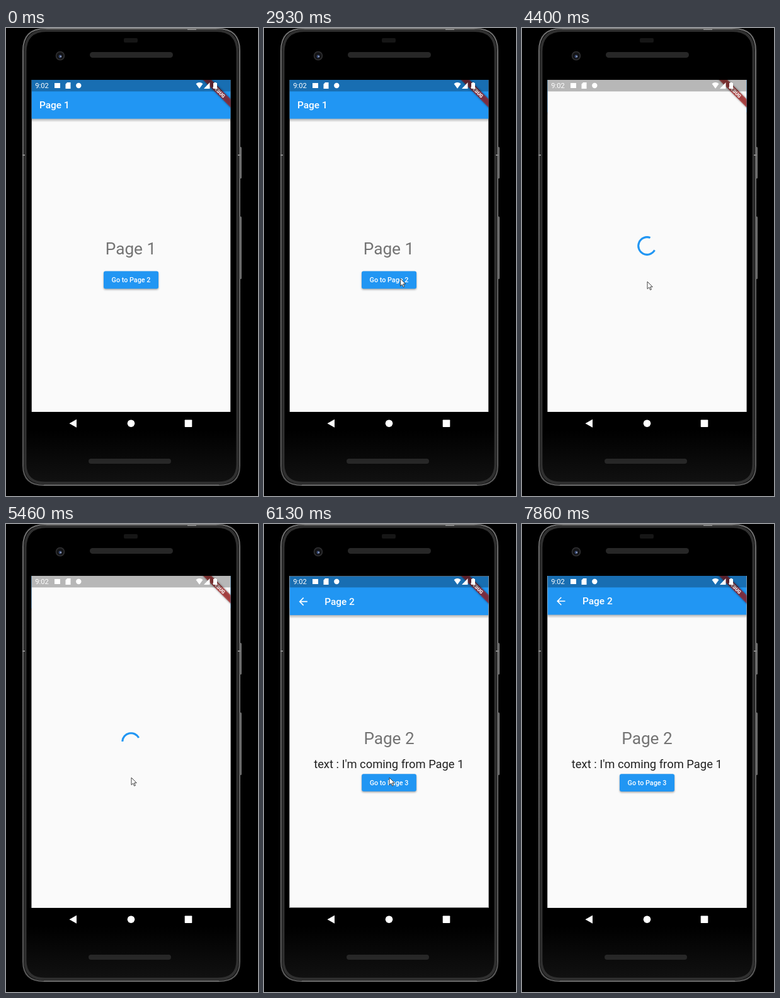
Recreate the animation shown at these times as an HTML page. Size 400x740 px, loop 8 s.

```html
<!DOCTYPE html>
<html lang="en">
<head>
<meta charset="utf-8">
<title>Page navigation</title>
<style>
  html, body { margin: 0; width: 100%; height: 100%; overflow: hidden; background: #000; }
  svg { display: block; width: 400px; height: 740px; font-family: Roboto, sans-serif; }
  .title { font-size: 15.4px; font-weight: 500; fill: #fff; }
  .head { font-size: 26.2px; fill: #737373; text-anchor: middle; }
  .body { font-size: 18.4px; fill: #202020; text-anchor: middle; }
  .label { font-size: 10.8px; font-weight: 500; fill: #fff; text-anchor: middle; }
  .soft { filter: blur(1.5px); }
</style>
</head>
<body>
<svg id="stage" viewBox="0 0 400 740"></svg>
<script>
const LOOP = 8000, PUSH_LOADER = 3880, PUSH_PAGE2 = 5932, ZOOM = 300;
const CX = 198.5, CY = 344.5;
const BLUE = '#2196f3', PAPER = '#fafafa';

const screenRect = (fill, extra = '') =>
  `<rect x="40.5" y="82" width="316" height="525" fill="${fill}" ${extra}/>`;

const appBar = (title, x) => `
  <rect x="40.5" y="143" width="316" height="6" fill="url(#shade)"/>
  <rect x="40.5" y="82" width="316" height="61.5" fill="${BLUE}"/>
  <text class="title" x="${x}" y="127.3">${title}</text>`;

const button = (y, label) => `
  <rect class="soft" x="155" y="${y + 1.5}" width="87" height="27.7" rx="3" opacity=".35"/>
  <rect x="155" y="${y}" width="87" height="27.7" rx="3" fill="${BLUE}"/>
  <text class="label" x="${CX}" y="${y + 17.7}">${label}</text>`;

const phone = `
  <rect x="370" y="188" width="4" height="50" rx="1.5" fill="#6e6e6e"/>
  <rect x="370" y="298" width="4" height="99" rx="1.5" fill="#6e6e6e"/>
  <path d="M62 1H336Q371 1 371 36V692Q371 723 338 723H60Q27 723 27 692V36Q27 1 62 1Z"
    fill="url(#body)" stroke="url(#rim)" stroke-width="2"/>
  <path d="M64 4H334Q367.5 4 367.5 38V690Q367.5 719.5 336 719.5H62Q30.5 719.5 30.5 690V38Q30.5 4 64 4Z"
    fill="none" stroke="#303030" stroke-width="4"/>
  <path d="M64 1.5H334M60 722.5H338" stroke="#808080" stroke-width="1.2"/>
  <path d="M26 201H30M288 2H302M368 201H372" stroke="#8c8c8c" stroke-width="2"/>
  <rect x="187" y="16" width="22" height="7" rx="2" fill="#161616"/>
  <rect x="133" y="38" width="132" height="9" rx="4.5" fill="#272727"/>
  <rect x="131" y="681" width="131" height="8" rx="4" fill="#272727"/>
  <circle cx="86" cy="44" r="6.5" fill="#141416" stroke="#303032" stroke-width="1.5"/>
  <circle cx="86" cy="45" r="2.4" fill="#3a4d78"/>
  <circle cx="87" cy="45" r=".9" fill="#c3cbe0"/>
  <g fill="#fff">
    <path d="M100.5 625.2L112 618.7V631.7Z"/>
    <circle cx="198.5" cy="625.2" r="5.8"/>
    <rect x="283.7" y="619.4" width="11.6" height="11.6" rx=".8"/>
  </g>`;

const banner = `
  <g transform="translate(356.5 82) rotate(45)">
    <rect class="soft" x="-33" y="21.5" width="66" height="9.3" opacity=".5"/>
    <rect x="-33" y="21.5" width="66" height="9.3" fill="#b71c1c" opacity=".63"/>
    <text y="28.9" font-size="7.6" font-weight="900" fill="#fff" text-anchor="middle">DEBUG</text>
  </g>`;

const statusBar = `
  <rect x="40.5" y="82" width="316" height="18.3" opacity=".27"/>
  <g fill="#fff">
    <text x="46.3" y="95.2" font-size="11.2">9:02</text>
    <rect x="77" y="87" width="9" height="8"/>
    <path d="M97.2 86H102.5V96H94.5V88.7Z"/>
    <circle cx="115.3" cy="91" r="4.2"/>
    <path d="M301.5 88.2Q307 83.8 312.5 88.2L307 95.7Z"/>
    <path d="M323.5 86V96H314Z"/>
    <path d="M330.5 86H333.5V87H335V96H329V87H330.5Z"/>
  </g>`;

document.getElementById('stage').innerHTML = `
  <defs>
    <linearGradient id="shade" x2="0" y2="1">
      <stop stop-opacity=".3"/><stop offset="1" stop-opacity="0"/>
    </linearGradient>
    <linearGradient id="body" x2="0" y2="1">
      <stop offset=".88"/><stop offset="1" stop-color="#121212"/>
    </linearGradient>
    <linearGradient id="rim" x2="0" y2="1">
      <stop stop-color="#707070"/><stop offset="1" stop-color="#585858"/>
    </linearGradient>
    <clipPath id="screen">${screenRect('#fff')}</clipPath>
  </defs>
  <rect width="400" height="740"/>
  ${phone}
  <g clip-path="url(#screen)">
    <g id="page1">
      ${screenRect(PAPER)}
      ${appBar('Page 1', 53)}
      <text class="head" x="198" y="358">Page 1</text>
      ${button(384.5, 'Go to Page 2')}
    </g>
    ${screenRect('#000', 'id="scrim1"')}
    <g id="loader">
      ${screenRect(PAPER)}
      <path id="arc" fill="none" stroke="${BLUE}" stroke-width="3.1"/>
    </g>
    ${screenRect('#000', 'id="scrim2"')}
    <g id="page2">
      ${screenRect(PAPER)}
      ${appBar('Page 2', 96)}
      <path d="M68.5 122H56.5M62.3 116L56.3 122L62.3 128" fill="none" stroke="#fff" stroke-width="1.6"/>
      <text class="head" x="198.5" y="347.7">Page 2</text>
      <text class="body" x="198.3" y="386">text : I'm coming from Page 1</text>
      ${button(395.3, 'Go to Page 3')}
    </g>
    ${banner}
    ${statusBar}
  </g>
  <path id="cursor" d="M0 0V11.5L2.7 9L4.6 13.2L6.4 12.4L4.5 8.3H8.2Z"
    fill="#fff" stroke="#303030" stroke-width=".9"/>`;

const set = (id, attrs) => {
  const el = document.getElementById(id);
  for (const k in attrs) el.setAttribute(k, attrs[k]);
};
const clamp = v => Math.min(1, Math.max(0, v));
const interval = (p, from, to) => clamp((p - from) / (to - from));

function bezier(x, x1, y1, x2, y2) {
  const at = (u, a, b) => 3 * (1 - u) ** 2 * u * a + 3 * (1 - u) * u * u * b + u ** 3;
  let lo = 0, hi = 1;
  for (let i = 0; i < 20; i++) {
    const u = (lo + hi) / 2;
    if (at(u, x1, x2) < x) lo = u; else hi = u;
  }
  return at(hi, y1, y2);
}
const ease = x => bezier(x, 0.4, 0, 0.2, 1);

// Slow start, sharp rise, long settling.
const zoomCurve = p => p < 1 / 6
  ? 0.4 * bezier(clamp(p * 6), 0.05, 0, 0.1333, 0.06)
  : 0.4 + 0.6 * bezier(interval(p, 1 / 6, 1), 0.2083, 0.82, 0.25, 1);

// enter and leave: progress of the page's own push and of the push that covers it
function placePage(id, enter, leave) {
  const s = (0.85 + 0.15 * zoomCurve(enter)) * (1 + 0.05 * zoomCurve(leave));
  set(id, {
    transform: `translate(${CX} ${CY}) scale(${s}) translate(${-CX} ${-CY})`,
    opacity: interval(enter, 0.125, 0.25)
  });
}

function spin(t) {
  const phase = t / 1333 % 1;
  const head = ease(clamp(phase * 2)), tail = ease(clamp(phase * 2 - 1));
  const from = Math.PI * (-0.5 + tail * 1.5 + t / 1111 + phase / 2);
  const sweep = Math.max(0.01, (head - tail) * 1.5 * Math.PI);
  const at = a => `${CX + 13.8 * Math.cos(a)} ${CY + 13.8 * Math.sin(a)}`;
  set('arc', { d: `M${at(from)}A13.8 13.8 0 ${+(sweep > Math.PI)} 1 ${at(from + sweep)}` });
}

// time, x, y
const track = [
  [1900, 330, 520], [2800, 216.5, 396.5], [3080, 216.5, 396.5],
  [3390, 199, 401], [6200, 199, 401], [6750, 300, 560]
];

function moveCursor(t) {
  const i = track.findIndex(k => k[0] > t);
  set('cursor', { visibility: i > 0 ? 'visible' : 'hidden' });
  if (i < 1) return;
  const [t0, x0, y0] = track[i - 1], [t1, x1, y1] = track[i];
  const u = ease((t - t0) / (t1 - t0));
  set('cursor', { transform: `translate(${x0 + (x1 - x0) * u} ${y0 + (y1 - y0) * u})` });
}

function draw() {
  const t = performance.now() % LOOP;
  const load = clamp((t - PUSH_LOADER) / ZOOM), next = clamp((t - PUSH_PAGE2) / ZOOM);
  placePage('page1', 1, load);
  placePage('loader', load, next);
  placePage('page2', next, 0);
  set('scrim1', { opacity: 0.6 * interval(load, 0.2075, 0.4175) });
  set('scrim2', { opacity: 0.6 * interval(next, 0.2075, 0.4175) });
  spin(Math.max(0, t - PUSH_LOADER));
  moveCursor(t);
  requestAnimationFrame(draw);
}
draw();
</script>
</body>
</html>
```
